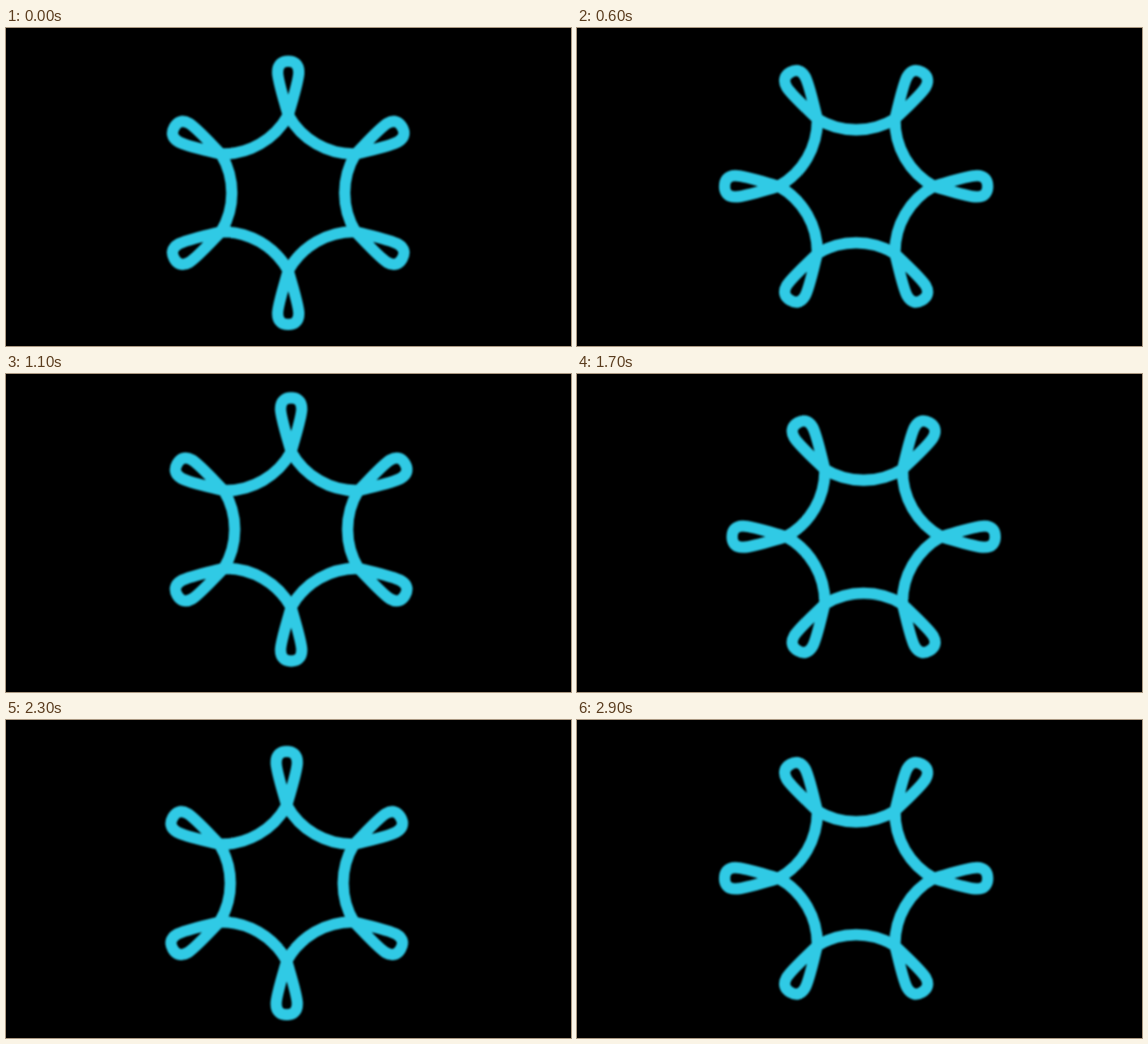
These frames come from a looping animation (640x360 px, 3.4 s). An HTML page:

```html
<!DOCTYPE html>
<html lang="en">
<head>
<meta charset="utf-8">
<title>Looped ring</title>
<style>
  html, body { margin: 0; width: 100%; height: 100%; overflow: hidden; background: #000; }
  svg { display: block; width: 640px; height: 360px; filter: blur(1.1px); }
  path { fill: none; stroke: #30cae5; stroke-width: 12.8; stroke-linecap: round; stroke-linejoin: round; }
</style>
</head>
<body>
<svg viewBox="0 0 640 360"><g id="ring"></g></svg>
<script>
  const ring = document.getElementById('ring');
  const knot = 88;  // distance from the centre to each crossing
  const bend = 85;  // radius of the arcs between crossings

  // Half of a loop, from its crossing to its tip; side is 1 or -1.
  const halfLoop = side => `M${knot} 0
    C101 ${side * 3.5} 127 ${side * 12} 136.5 ${side * 12}
    S149 ${side * 6.5} 149 0`;

  // One sixth of the ring: an inward arc and a loop.
  const arc = `M${knot / 2} ${-knot * Math.sin(Math.PI / 3)} A${bend} ${bend} 0 0 0 ${knot} 0`;
  const petal = arc + halfLoop(1) + halfLoop(-1);

  for (let i = 0; i < 6; i++) {
    const path = document.createElementNS('http://www.w3.org/2000/svg', 'path');
    path.setAttribute('d', petal);
    path.setAttribute('transform', `rotate(${i * 60})`);
    ring.append(path);
  }

  // The ring makes quarter turns while its centre wobbles.
  const left = { x: 316.2, y: 179.2, hold: 500 };
  const poses = [
    { x: 319.7, y: 186.7, hold: 600 },
    left,
    { x: 323, y: 176, hold: 600 },
    { x: 324.7, y: 184.2, hold: 600 },
    { x: 318, y: 184.7, hold: 600 },
    left
  ];
  const duration = poses.reduce((sum, pose) => sum + pose.hold, 0);
  const start = performance.now();

  function draw(now) {
    let t = Math.max(0, now - start) % duration;
    let i = 0;
    while (t >= poses[i].hold) t -= poses[i++].hold;
    const { x, y } = poses[i];
    ring.setAttribute('transform', `translate(${x} ${y}) rotate(${90 * (i + 1)})`);
    requestAnimationFrame(draw);
  }
  draw(start);
</script>
</body>
</html>
```
